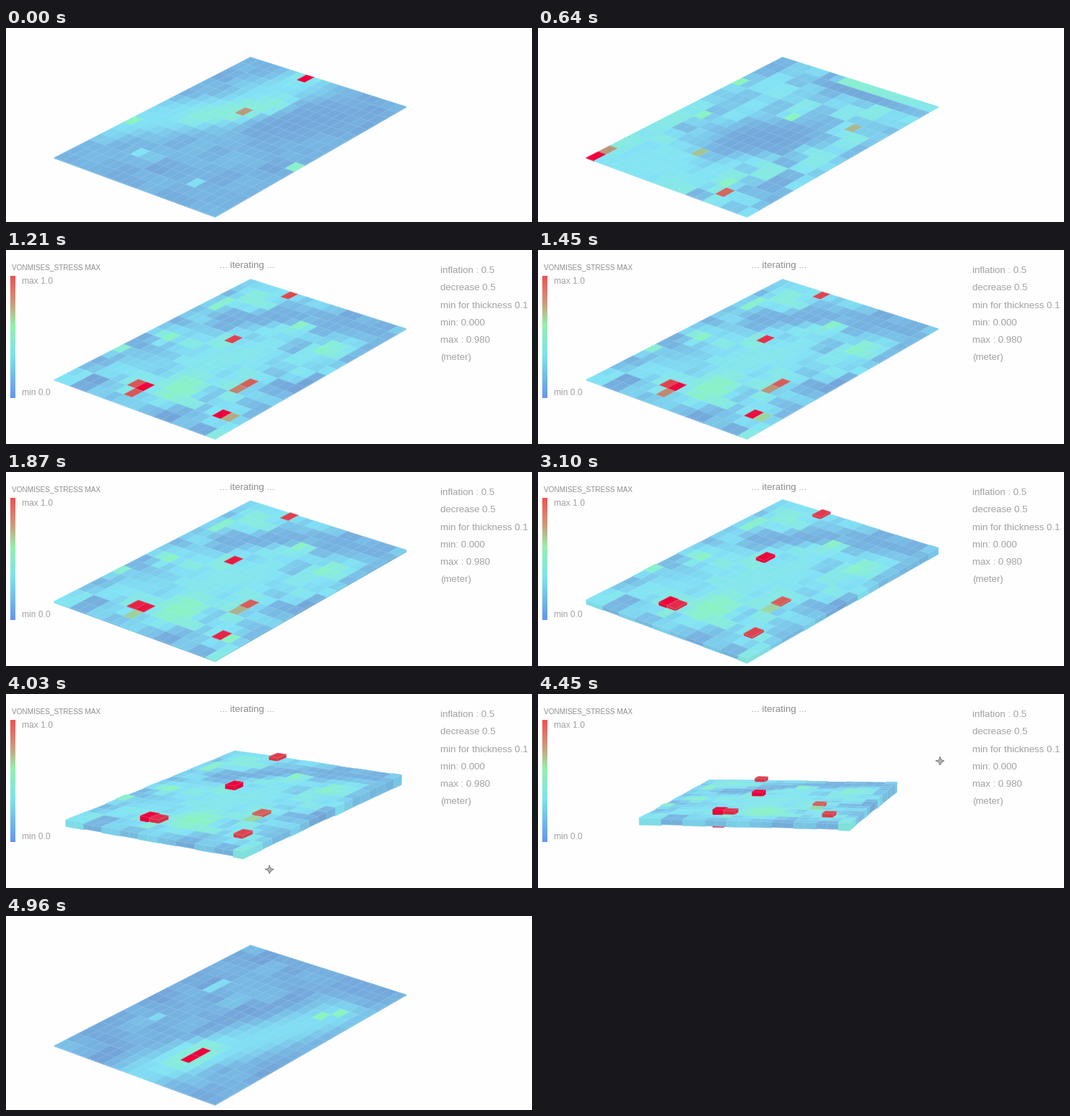
Animation of 729 by 270 pixels, one loop 5.06 s. Source, as a matplotlib script:

```python
import numpy as np
import matplotlib.pyplot as plt
from matplotlib.animation import FuncAnimation
from matplotlib.collections import PolyCollection
from matplotlib.colors import LinearSegmentedColormap

W, H, DPI = 729, 270, 100
LOOP, STEP = 5060, 20

# Plate: NU x NV cells, sides in pixels, seen by a perspective camera
NU, NV = 18, 19
SIDE_U, SIDE_V = 431.9, 280.0
CX, CY, DIST = 316, 144.7, 3534
AZIM, ELEV = 51.59, 25.57

# The picture changes after a long hold, then at short and long beats
BEATS = "SSLSLLSSLSLLSSSLLSLLSSLSLLSLSLSSLS"
TIMES = np.cumsum([0, 400] + [150 if b == "L" else 120 for b in BEATS])
PANEL_ON, PANEL_OFF = 1060, 4840
ORBIT_ON, CURSOR_ON, ORBIT_OFF = 3760, 4030, 4690


def color_ramp(name, stops):
    return LinearSegmentedColormap.from_list(
        name, [(p, tuple(c / 255 for c in rgb)) for p, rgb in stops])


STRESS = color_ramp("stress", [
    (0, (114, 160, 215)), (0.2, (121, 188, 229)), (0.4, (130, 227, 246)),
    (0.52, (136, 238, 214)), (0.6, (138, 246, 184)), (0.75, (184, 156, 124)),
    (0.88, (217, 88, 86)), (1, (240, 0, 58))])
LEGEND = color_ramp("legend", [
    (0, (100, 150, 240)), (0.35, (125, 226, 235)), (0.6, (150, 240, 175)),
    (0.78, (205, 155, 120)), (1, (242, 80, 82))])


def progress(t, start, end):
    return np.clip((t - start) / (end - start), 0, 1)


def ease_out(s):
    return 1 - (1 - s) ** 2


def ease_both(s):
    return s * s * (3 - 2 * s)


def project(u, v, z, view):
    """Cell coordinates and height to stage pixels."""
    a, e = np.radians(view["azim"]), np.radians(view["elev"])
    p, q = (u / NU - 0.5) * SIDE_U, (v / NV - 0.5) * SIDE_V
    across = p * np.cos(a) + q * np.sin(a)
    away = p * np.sin(a) - q * np.cos(a)
    k = DIST / (DIST + away * np.cos(e) - z * np.sin(e))
    up = away * np.sin(e) + z * np.cos(e)
    return np.stack([CX + view["dx"] + k * across,
                     CY + view["dy"] - k * up], axis=-1)


def locate(x, y):
    """Stage pixel on the flat plate to cell coordinates."""
    a, e = np.radians(AZIM), np.radians(ELEV)
    dx, dy = x - CX, y - CY
    away = -dy * DIST / (np.sin(e) * DIST + dy * np.cos(e))
    across = dx * (DIST + away * np.cos(e)) / DIST
    p = across * np.cos(a) + away * np.sin(a)
    q = across * np.sin(a) - away * np.cos(a)
    return np.array([(p / SIDE_U + 0.5) * NU, (q / SIDE_V + 0.5) * NV])


CELLS = np.stack(np.meshgrid(np.arange(NU) + 0.5, np.arange(NV) + 0.5,
                             indexing="ij"), axis=-1)


def patchy(base, amount, border, seed):
    """Random patches a few cells long, lower towards the plate's border."""
    grain = np.random.default_rng(seed).normal(size=(NU, NV // 2 + 1))
    grain = np.repeat(grain, 2, axis=1)[:, :NV]
    grain = (grain + np.roll(grain, 1, axis=0)) / 1.4
    edge = np.minimum(CELLS, [NU, NV] - CELLS).min(axis=-1)
    field = base + amount * grain - border * np.exp(-edge / 1.5)
    return np.clip(field, 0.03, 0.47)


def paint(field, level, width, *points):
    """Pull the cells near a path of stage points to one stress level."""
    nodes = [locate(*p) for p in points]
    near = np.full((NU, NV), np.inf)
    for a, b in zip(nodes, nodes[1:] or nodes):
        ab = b - a
        s = np.clip((CELLS - a) @ ab / max(ab @ ab, 1e-9), 0, 1)
        gap = CELLS - a - s[..., None] * ab
        near = np.minimum(near, np.hypot(gap[..., 0], gap[..., 1]))
    return field + (level - field) * np.exp(-(near / width) ** 3)


def add_cells(field, cells):
    """Single cells (x, y, stress); the hot ones get a green halo."""
    for x, y, level in cells:
        if level > 0.7:
            field = paint(field, 0.5, 1.1, (x, y))
    for x, y, level in cells:
        i, j = locate(x, y).astype(int)
        field[i, j] = level
    return field


def bridge():
    field = patchy(0.17, 0.045, 0.06, 1)
    field = paint(field, 0.06, 3, (380, 135), (450, 125))
    field = paint(field, 0.39, 3, (170, 130), (300, 115), (416, 72))
    field = paint(field, 0.5, 1.6, (270, 123), (370, 108))
    return add_cells(field, [
        (416, 70, 1), (321, 120, 0.75), (334, 113, 0.75), (172, 131, 0.58),
        (398, 195, 0.55), (188, 168, 0.4), (265, 216, 0.38)])


def scattered():
    field = patchy(0.34, 0.11, 0, 2)
    field = paint(field, 0.42, 3, (130, 190), (180, 195))
    field = paint(field, 0.06, 3, (285, 155), (345, 150))
    field = paint(field, 0.06, 1, (412, 82), (535, 112))
    field = paint(field, 0.54, 0.7, (425, 72), (550, 109))
    return add_cells(field, [
        (78, 179, 1), (95, 169, 0.76), (258, 227, 0.85), (428, 143, 0.7),
        (220, 178, 0.68), (234, 173, 0.68), (290, 75, 0.58),
        (362, 122, 0.58), (228, 125, 0.57), (270, 217, 0.57)])


# Hot cells while iterating: x, y, stress at the start and at the end
HOT = [(393, 63, 0.9, 0.92), (307, 127, 0.91, 1), (333, 187, 0.87, 0.87),
       (320, 194, 0.8, 0.65), (179, 185, 0.88, 1), (190, 189, 1, 0.94),
       (175, 198, 0.88, 0.5), (298, 228, 1, 0.91), (311, 232, 0.72, 0.45)]


def iterating(base, amount, stage):
    field = patchy(base, amount, 0.16, 3)
    field = paint(field, 0.12, 1.3, (300, 95), (430, 95), (520, 112))
    field = paint(field, 0.44, 3, (290, 155), (335, 145))
    field = paint(field, 0.57, 2.4, (240, 194))
    field = paint(field, 0.5, 1.8, (345, 66))
    for spot in [(298, 76), (225, 122), (153, 137), (408, 107), (445, 137)]:
        field = paint(field, 0.57, 1, spot)
    return add_cells(field, [(h[0], h[1], h[2 + stage]) for h in HOT])


def restart():
    field = patchy(0.12, 0.045, 0.05, 6)
    field = paint(field, 0.37, 3, (205, 212), (260, 197), (370, 165),
                  (445, 142))
    field = paint(field, 0.53, 1.9, (252, 198), (267, 190))
    return add_cells(field, [
        (252, 198, 1), (267, 190, 1), (440, 138, 0.58), (453, 138, 0.58),
        (288, 98, 0.37), (302, 92, 0.37), (208, 145, 0.34)])


FIELD_KEYS = [(0, bridge()), (640, scattered()),
              (1210, iterating(0.31, 0.1, 0)),
              (3100, iterating(0.37, 0.08, 1)),
              (4690, iterating(0.37, 0.08, 1)), (4960, restart())]


def field_at(t):
    for (t0, f0), (t1, f1) in zip(FIELD_KEYS, FIELD_KEYS[1:]):
        if t < t1:
            return f0 + (f1 - f0) * ease_out(progress(t, t0, t1))
    return FIELD_KEYS[-1][1]


def view_at(t):
    s = progress(t, ORBIT_ON, ORBIT_OFF) if t < PANEL_OFF else 0
    tilt = ease_out(s)
    return {"azim": AZIM + 33 * ease_both(s), "elev": ELEV - 19.5 * tilt,
            "dx": 13 * tilt, "dy": 8 * tilt}


def lift_at(t):
    return np.clip((t - 1450) / 1650, 0, 1.5) if t < PANEL_OFF else 0


# Cells from back to front, so nearer boxes cover farther ones
I, J = (g.ravel() for g in np.meshgrid(np.arange(NU)[::-1], np.arange(NV),
                                       indexing="ij"))


def build_boxes(t):
    level = field_at(t)[I, J]
    swell = 1.5 + 2.5 * (I / NU) * (J / NV)
    top = 0.5 + lift_at(t) * (swell + 3 * level + 3 * level ** 4)
    view = view_at(t)

    def face(*corners):
        return np.stack([project(I + di, J + dj, s * top, view)
                         for di, dj, s in corners], axis=1)

    faces = np.stack([
        face((0, 0, 1), (0, 1, 1), (0, 1, -1), (0, 0, -1)),
        face((0, 1, 1), (1, 1, 1), (1, 1, -1), (0, 1, -1)),
        face((0, 0, 1), (1, 0, 1), (1, 1, 1), (0, 1, 1))], axis=1)
    fill = np.repeat(STRESS(level)[:, None, :], 3, axis=1)
    fill[:, :2, :3] *= 0.96
    edge = fill.copy()
    edge[..., :3] += (np.array([0.75, 0.92, 0.97]) - edge[..., :3]) * 0.25
    return faces.reshape(-1, 4, 2), fill.reshape(-1, 4), edge.reshape(-1, 4)


fig = plt.figure(figsize=(W / DPI, H / DPI), dpi=DPI, facecolor="#fefefe")
ax = fig.add_axes([0, 0, 1, 1])

plate = PolyCollection([], linewidths=0.45, zorder=1)
ax.add_collection(plate)


def label(x, y, text, px, color="#a2a2a2", ha="left"):
    return ax.text(x, y, text, family="Liberation Sans", fontsize=px * 0.72,
                   color=color, ha=ha, va="baseline", zorder=3)


panel = [
    ax.imshow(np.linspace(1, 0, 170)[:, None], cmap=LEGEND, aspect="auto",
              extent=(6, 12.5, 206, 36.5), zorder=3),
    label(8, 27.5, "VONMISES_STRESS MAX", 10, "#8e8e8e"),
    label(22, 47, "max 1.0", 12),
    label(22, 201.5, "min 0.0", 12),
    label(334.5, 25, "... iterating ...", 13.3, "#8e8e8e", "center"),
]
notes = ["inflation : 0.5", "decrease 0.5", "min for thickness 0.1",
         "min: 0.000", "max : 0.980", "(meter)"]
panel += [label(602.5, 32.3 + 24.2 * n, s, 13.3) for n, s in enumerate(notes)]

cursor = [
    ax.plot([], [], "+", ms=9, mew=1.2, color="#7c7c7c", zorder=4)[0],
    ax.plot([], [], "D", ms=4, mew=0.8, mfc="#b4b4b4", mec="#8a8a8a",
            zorder=4)[0],
]

ax.set_xlim(0, W)
ax.set_ylim(H, 0)
ax.axis("off")

shown = {"t": None}


def show(t):
    faces, fill, edge = build_boxes(t)
    plate.set_verts(faces)
    plate.set_facecolor(fill)
    plate.set_edgecolor(edge)
    for item in panel:
        item.set_visible(PANEL_ON <= t < PANEL_OFF)
    s = ease_both(progress(t, CURSOR_ON, ORBIT_OFF))
    for mark in cursor:
        mark.set_data([365 + 275 * s], [243.5 - 215 * s])
        mark.set_visible(CURSOR_ON <= t < PANEL_OFF)


def update(i):
    now = i * STEP + STEP / 2
    t = TIMES[np.searchsorted(TIMES, now, side="right") - 1]
    if t != shown["t"]:
        show(t)
        shown["t"] = t
    return [plate, *panel, *cursor]


def init():
    shown["t"] = None
    return update(0)


anim = FuncAnimation(fig, update, frames=LOOP // STEP, init_func=init,
                     interval=STEP, repeat=True, repeat_delay=0, blit=False)
plt.show()
```
